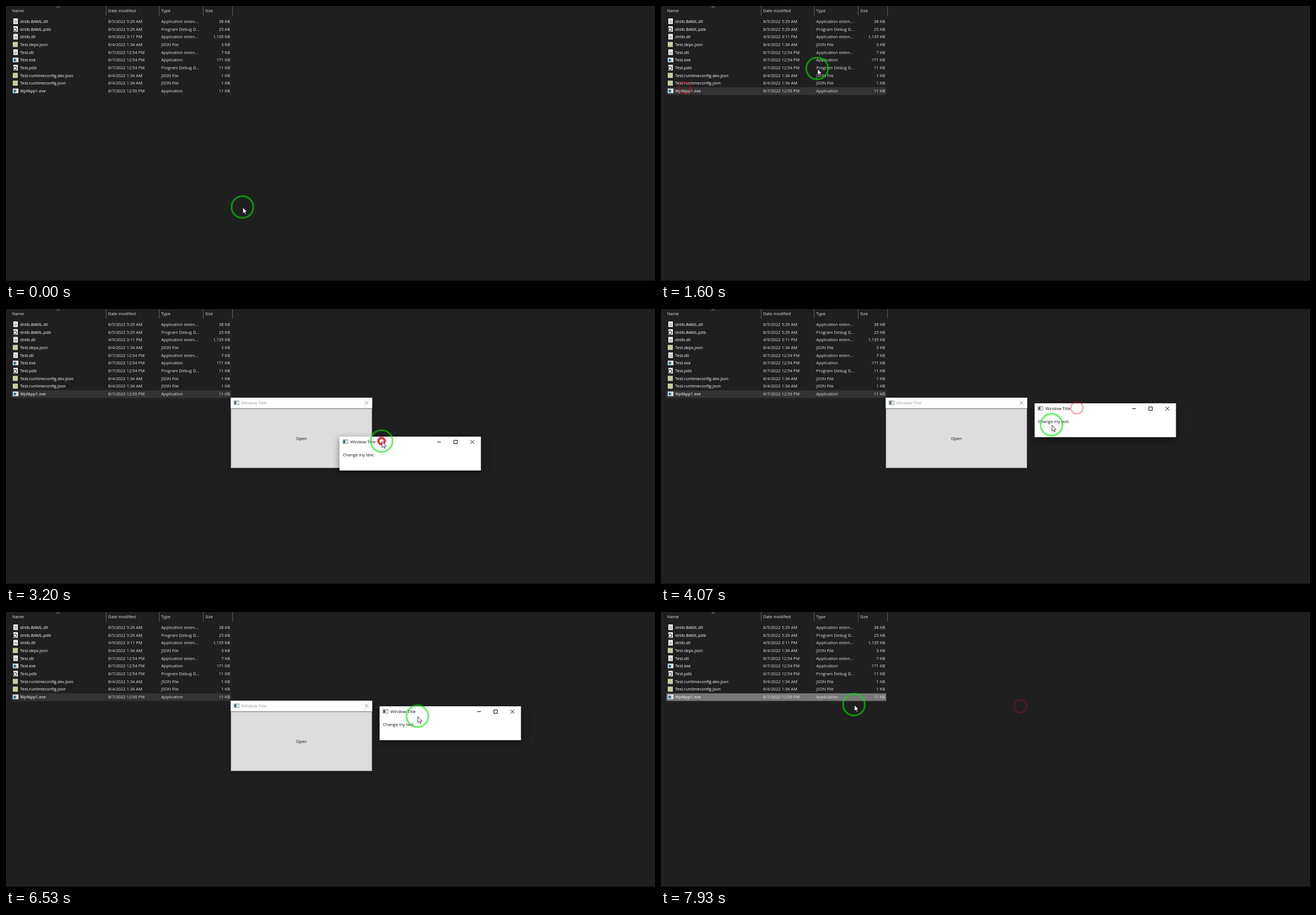
Write an HTML page with a canvas that moves like this. It is 1150x487 px and loops after 8000 ms.

```html
<!DOCTYPE html>
<html lang="en">
<head>
<meta charset="utf-8">
<title>File list and two windows</title>
<style>
  html, body { margin: 0; width: 100%; height: 100%; overflow: hidden; background: #1f1f1f; }
  canvas { display: block; }
</style>
</head>
<body>
<canvas id="stage" width="1150" height="487"></canvas>
<script>
const ctx = document.getElementById('stage').getContext('2d');
const LOOP = 8000, FPS = 15;

const files = [
  ['dll', 'dnlib.BAML.dll', '8/5/2022 5:29 AM', '38 KB'],
  ['pdb', 'dnlib.BAML.pdb', '8/5/2022 5:29 AM', '25 KB'],
  ['dll', 'dnlib.dll', '4/9/2022 3:11 PM', '1,135 KB'],
  ['json', 'Test.deps.json', '8/4/2022 1:34 AM', '3 KB'],
  ['dll', 'Test.dll', '8/7/2022 12:54 PM', '7 KB'],
  ['exe', 'Test.exe', '8/7/2022 12:54 PM', '171 KB'],
  ['pdb', 'Test.pdb', '8/7/2022 12:54 PM', '11 KB'],
  ['json', 'Test.runtimeconfig.dev.json', '8/4/2022 1:34 AM', '1 KB'],
  ['json', 'Test.runtimeconfig.json', '8/4/2022 1:34 AM', '1 KB'],
  ['exe', 'WpfApp1.exe', '8/7/2022 12:50 PM', '11 KB']
];
const types = { dll: 'Application exten...', pdb: 'Program Debug D...', json: 'JSON File', exe: 'Application' };

// What happens when, in ms
const FIRST_CLICK = 1150, MAIN_OPEN = 1600, BUTTON_CLICK = 2530, DIALOG_OPEN = 2700;
const DRAG_START = 2933, DRAG_END = 3833;
const DIALOG_CLOSE = 6990, MAIN_CLOSE = 7690;

// Places the pointer travels between: time, x, y
const stops = [
  [0, 419, 356], [770, 110, 46], [1130, 42, 145], [1400, 42, 145],
  [1733, 430, 92], [2200, 528, 229], [2667, 528, 229],
  [DRAG_START, 473, 198], [3267, 688, 238], [3467, 588, 228], [DRAG_END, 737, 175],
  [4067, 692, 205], [4600, 713, 200], [4933, 670, 168], [5200, 699, 182],
  [5600, 429, 172], [5733, 420, 168], [6067, 466, 177], [6467, 690, 185],
  [6867, 890, 177], [6980, 890, 177], [7200, 689, 173], [7533, 639, 167],
  [7667, 639, 167], [7933, 342, 164]
];
const clicks = [
  [FIRST_CLICK, 1230], [1330, 1400], [BUTTON_CLICK, 2620],
  [DRAG_START, DRAG_END], [6920, 6960], [7640, 7680]
];

const clamp = (v, lo = 0, hi = 1) => Math.max(lo, Math.min(hi, v));
const inside = (p, x, y, w, h) => p.x >= x && p.x < x + w && p.y >= y && p.y < y + h;
const fade = (t, from, to) => clamp((t - from) / 130) * (1 - clamp((t - to) / 130));

// Monotone cubic through the stops: no overshoot, smooth where the direction is kept
function pointer(t) {
  let i = 0;
  while (i < stops.length - 2 && stops[i + 1][0] <= t) i++;
  const a = stops[i], b = stops[i + 1], span = b[0] - a[0], u = clamp((t - a[0]) / span);
  const slope = (k, axis) => stops[k] && stops[k + 1]
    ? (stops[k + 1][axis] - stops[k][axis]) / (stops[k + 1][0] - stops[k][0]) : 0;
  const tangent = (k, axis) => {
    const l = slope(k - 1, axis), r = slope(k, axis);
    return l * r > 0 ? 2 * l * r / (l + r) : 0;
  };
  const at = axis => a[axis] + (b[axis] - a[axis]) * u * u * (3 - 2 * u) +
    span * u * (1 - u) * (tangent(i, axis) * (1 - u) - tangent(i + 1, axis) * u);
  return { x: at(1), y: at(2) };
}

// The dialog follows the pointer while its title is held
function dialogPlace(t) {
  const held = pointer(clamp(t, DRAG_START, DRAG_END)), end = pointer(DRAG_END);
  return { x: Math.round(662 + held.x - end.x), y: Math.round(167 + held.y - end.y) };
}

function rect(x, y, w, h, fill) {
  ctx.fillStyle = fill;
  ctx.fillRect(x, y, w, h);
}
function frame(x, y, w, h, color) {
  ctx.strokeStyle = color;
  ctx.lineWidth = 1;
  ctx.strokeRect(x, y, w, h);
}
function line(color, ...points) {
  ctx.strokeStyle = color;
  ctx.lineWidth = 1;
  ctx.beginPath();
  points.forEach(([x, y]) => ctx.lineTo(x, y));
  ctx.stroke();
}
function circle(x, y, r, color, width) {
  ctx.strokeStyle = color;
  ctx.lineWidth = width;
  ctx.beginPath();
  ctx.arc(x, y, r, 0, 7);
  ctx.stroke();
}
function text(str, x, midY, color, size = 7.4, align = 'left') {
  ctx.font = `${size}px "Open Sans", "Noto Sans", sans-serif`;
  ctx.textAlign = align;
  ctx.fillStyle = color;
  ctx.fillText(str, x, midY + 2.8);
}

function fileIcon(kind, y) {
  if (kind === 'exe') {
    rect(12, y - 4, 10, 8, '#f2f2f2');
    rect(13, y - 2, 8, 5, '#c9dde4');
    rect(13.5, y - 2, 4, 4.5, '#2b6680');
  } else if (kind === 'json') {
    rect(12, y - 4.5, 9, 9, '#c3d09a');
  } else {
    const pdb = kind === 'pdb';
    rect(13, y - 5, 8, 10, '#f0f0ec');
    circle(pdb ? 16 : 17, y + 1, pdb ? 2.8 : 1.8, pdb ? '#4a4a4a' : '#8d9a9e', 1.2);
  }
}

function fileList(t, p) {
  for (const x of [177, 271, 349, 401]) rect(x, 0, 1, 17, '#5c5c5c');
  line('#9a9a9a', [89.5, 3], [92.5, 0.5], [95.5, 3]);
  [['Name', 11], ['Date modified', 181], ['Type', 275], ['Size', 353]]
    .forEach(([label, x]) => text(label, x, 8.3, '#e2e2e2'));

  const mainOpen = t >= MAIN_OPEN && t < MAIN_CLOSE;
  files.forEach(([kind, name, date, size], i) => {
    const y = 27 + 13.7 * i, top = Math.round(y - 6.5);
    const hover = !mainOpen && inside(p, 10, top, 389, 13.7);
    const selected = i === 9 && t >= FIRST_CLICK;
    if (selected || hover) {
      rect(9.5, top, 389.5, 13.5, !selected ? '#4d4d4d' : mainOpen ? '#333' : '#777');
    }
    fileIcon(kind, y);
    text(name, 25, y, '#fff');
    text(date, 181, y, '#e2e2e2');
    text(types[kind], 275, y, '#e2e2e2');
    text(size, 397, y, '#e2e2e2', 7.4, 'right');
  });
}

function windowBase(x, y, w, h, active) {
  ctx.save();
  ctx.shadowColor = `rgba(0,0,0,${active ? 0.45 : 0.25})`;
  ctx.shadowBlur = active ? 12 : 6;
  ctx.shadowOffsetY = active ? 4 : 2;
  rect(x, y, w, h, '#fff');
  ctx.restore();
  rect(x + 5.5, y + 5, 10, 8, '#a9a9a9');
  rect(x + 6.5, y + 6.5, 8, 5.5, '#e6eaec');
  rect(x + 6.5, y + 6.5, 3.8, 5, '#3f6a7c');
  text('Window Title', x + 19, y + 9.5, active ? '#111' : '#999', 7.5);
}
function closeButton(x, y, box, hover, color) {
  if (hover) rect(...box, '#e81123');
  const c = hover ? '#fff' : color;
  line(c, [x - 3.4, y - 3.4], [x + 3.4, y + 3.4]);
  line(c, [x - 3.4, y + 3.4], [x + 3.4, y - 3.4]);
}

function mainWindow(t, p) {
  ctx.globalAlpha = fade(t, MAIN_OPEN, MAIN_CLOSE);
  if (ctx.globalAlpha) {
    // Blocked while the dialog is open
    const active = t < DIALOG_OPEN || t >= DIALOG_CLOSE;
    const hover = active && inside(p, 398, 177, 251, 105);
    const pressed = hover && clicks.some(([down, up]) => t >= down && t < up);
    const closeBox = [629, 157, 20, 19];
    windowBase(398, 157, 251, 125, active);
    closeButton(639, 166, closeBox, active && inside(p, ...closeBox), active ? '#111' : '#999');
    rect(398, 176, 251, 106, pressed ? '#c4e5f6' : hover ? '#bee6fd' : '#ddd');
    frame(398.5, 176.5, 250, 105, pressed ? '#2c628b' : hover ? '#3c7fb1' : '#707070');
    text('Open', 523.5, 229, '#111', 7.5, 'center');
  }
  ctx.globalAlpha = 1;
}

function dialogWindow(t, p) {
  ctx.globalAlpha = fade(t, DIALOG_OPEN, DIALOG_CLOSE);
  if (ctx.globalAlpha) {
    const { x, y } = dialogPlace(t);
    const closeBox = [x + 220, y, 30.5, 19];
    windowBase(x, y, 250.5, 60, true);
    line('#111', [x + 173, y + 9.5], [x + 179.5, y + 9.5]);
    frame(x + 202.5, y + 6.5, 6, 6, '#111');
    closeButton(x + 235.3, y + 9.4, closeBox, inside(p, ...closeBox), '#111');
    text('Change my text.', x + 6, y + 32, '#111', 7.5);
  }
  ctx.globalAlpha = 1;
}

// A red ring sits under the pressed pointer, then widens and fades after release
function clickRings(t) {
  for (const [down, up] of clicks) {
    const k = clamp((t - up) / 400);
    if (t < down || k === 1) continue;
    const p = pointer(Math.min(t, up));
    circle(p.x, p.y, 5.5 + 9 * k, `rgba(228,10,28,${0.85 * (1 - k)})`, 4 - 3 * k);
  }
}

function arrow({ x, y }) {
  circle(x, y, 19.3, 'rgba(0,232,0,.57)', 3.2);
  ctx.beginPath();
  [[0, 0], [0, 10.8], [2.5, 8.5], [4.2, 12.2], [5.8, 11.4], [4.2, 7.8], [7.5, 7.7]]
    .forEach(([dx, dy]) => ctx.lineTo(x + 0.8 + dx, y + 0.8 + dy));
  ctx.closePath();
  ctx.fillStyle = '#fff';
  ctx.fill();
  ctx.strokeStyle = '#111';
  ctx.lineWidth = 0.8;
  ctx.stroke();
}

function draw(now) {
  // The picture advances in whole steps
  const t = Math.floor((now % LOOP + 4) * FPS / 1000) * 1000 / FPS % LOOP;
  const p = pointer(t);
  rect(0, 0, 1150, 487, '#1f1f1f');
  rect(0, 486, 1150, 1, '#0d0d0d');
  fileList(t, p);
  mainWindow(t, p);
  dialogWindow(t, p);
  clickRings(t);
  arrow(p);
}

const begin = performance.now();
function tick() {
  draw(performance.now() - begin);
  requestAnimationFrame(tick);
}
tick();
</script>
</body>
</html>
```
